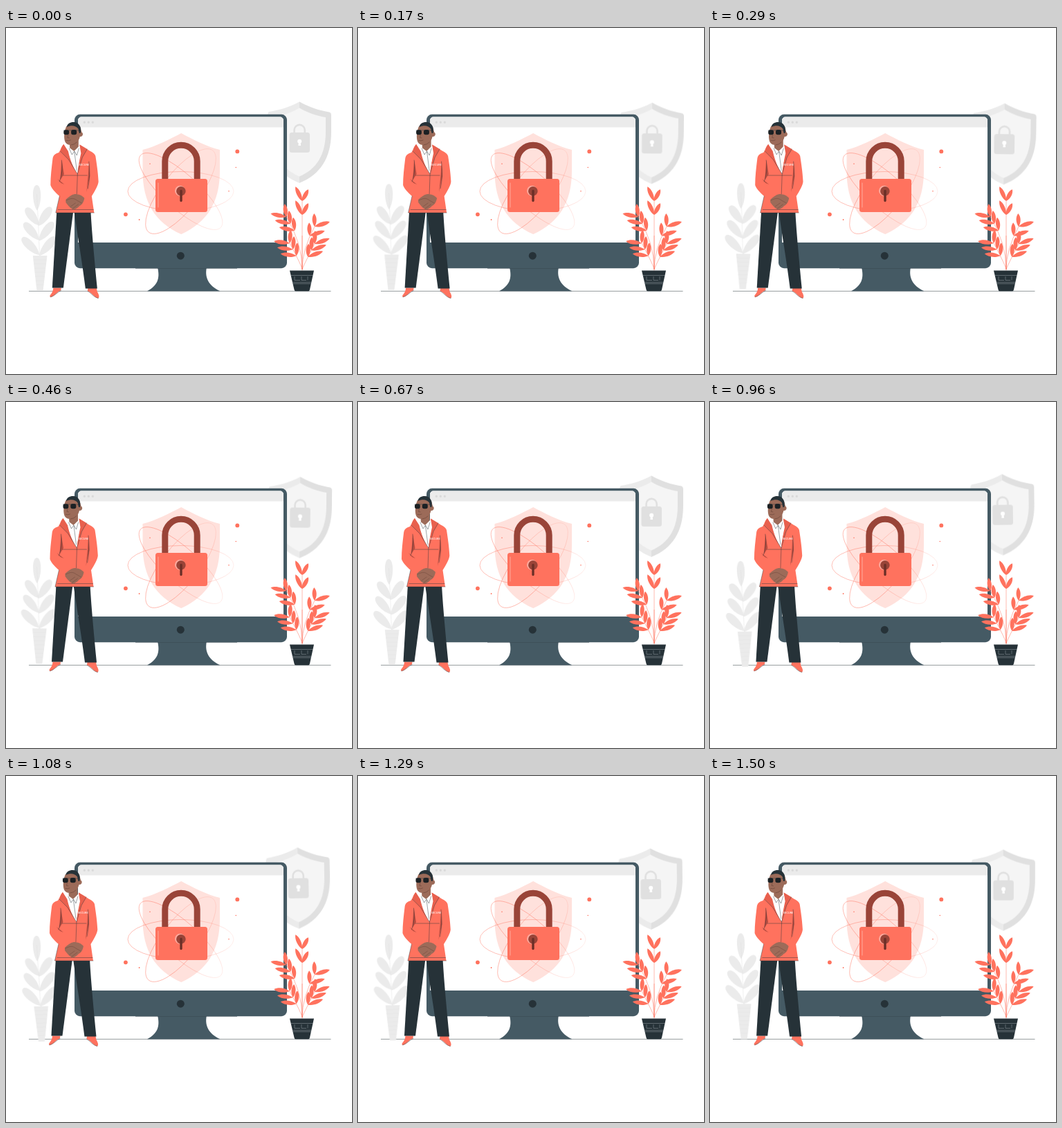
Animation, 500 px wide and 500 px high, one loop 1540 ms. Source, as an HTML page:

```html
<!DOCTYPE html>
<html lang="en">
<head>
<meta charset="utf-8">
<title>Security guard</title>
<style>
  html, body { margin: 0; width: 100%; height: 100%; overflow: hidden; background: #fff; }
  svg { display: block; width: 100vw; height: 100vh; }
  .sway, .shake { animation: 1540ms linear -55ms infinite; }
  .sway { animation-name: sway; transform-origin: 250px 250px; }
  .shake { animation-name: shake; }
  @keyframes sway {
    25% { transform: rotate(1deg); }
    75% { transform: rotate(-1deg); }
  }
  @keyframes shake {
    0%, 100% { transform: translateX(0); }
    10%, 90% { transform: translateX(-1px); }
    20%, 80% { transform: translateX(2px); }
    30%, 50%, 70% { transform: translateX(-4px); }
    40%, 60% { transform: translateX(4px); }
  }
  .coral { fill: #ff725e; }
  .dark { fill: #263238; }
  .steel { fill: #455a64; }
  .skin { fill: #9c6b59; }
  .line { fill: none; stroke: #263238; stroke-width: .45; stroke-linecap: round; stroke-linejoin: round; }
  .orbit { fill: none; stroke: url(#fade); stroke-width: .5; }
</style>
</head>
<body>
<svg viewBox="0 0 500 500">
  <defs>
    <linearGradient id="fade" gradientUnits="userSpaceOnUse" x1="176" y1="0" x2="329" y2="0">
      <stop offset=".4" stop-color="#ff725e" stop-opacity=".9"/>
      <stop offset="1" stop-color="#ff725e" stop-opacity=".25"/>
    </linearGradient>
  </defs>
  <path d="M33 380.3H469.500" stroke="#263238" stroke-width=".5"/>

  <!-- grey shield and plant -->
  <g class="sway">
    <g transform="rotate(-.14 250 250)">
      <path fill="#ebebeb" d="M424 106.500C409 115 393 119 380 121C377 123 377 133 377 150C378 188 394 212 424 224Z"/>
      <path fill="#e0e0e0" d="M424 106.500C439 115 453 119 467 121.500Q470 122 470 126V150C470 188 454 212 424 224Z"/>
      <path fill="#f5f5f5" d="M424 115.500C437 123 449 127 462 129V150C462 183 449 204 424 214.500C399 204 386 183 386 150V129C399 127 411 123 424 115.500Z"/>
      <path fill="none" stroke="#e0e0e0" stroke-width="2.600" d="M416.600 152V147.500a7.600 7.600 0 0 1 15.200 0V152"/>
      <rect x="409.500" y="151" width="29.500" height="29" rx="3.500" fill="#e0e0e0"/>
      <g fill="#fff"><circle cx="424.200" cy="163.800" r="3"/><path d="M423 165h2.500l.6 5h-3.700z"/></g>

      <path id="grey" fill="#ebebeb"/>
      <path fill="none" stroke="#e0e0e0" stroke-width=".5" d="M44.500 240Q47 285 48.500 329"/>
      <path fill="#ebebeb" d="M38.800 329H59.500L53.500 380H44.500Z"/>
      <path id="bands" stroke="#dedede" stroke-width=".4"/>
    </g>
  </g>

  <!-- monitor -->
  <path class="steel" d="M219 346C222 359 221.500 371 204 380.300H309.500C292 372 287 360 290 346Z"/>
  <rect class="steel" x="99" y="124.800" width="307" height="222.400" rx="8"/>
  <path d="M187 347.500H334" stroke="#37474f" stroke-width=".5"/>
  <path fill="#fff" d="M104 310V133.500a5 5 0 0 1 5-5H396a5 5 0 0 1 5 5V310Z"/>
  <path fill="#ebebeb" d="M104 143.500V133.500a5 5 0 0 1 5-5H396a5 5 0 0 1 5 5V143.500Z"/>
  <path d="M113.300 136.300h12.100" stroke="#dadada" stroke-width="3.400" stroke-linecap="round" stroke-dasharray="0 6"/>
  <circle class="dark" cx="252.300" cy="329.200" r="5.500"/>

  <!-- padlock -->
  <path fill="#ffe1dc" d="M253.200 152C236 161 217 171 197.500 176V207C197.500 251 215 281 253.200 298C291 281 309 251 309 207V176C289 171 270 161 253.200 152Z"/>
  <g class="orbit">
    <ellipse cx="252.500" cy="236" rx="76.500" ry="28.500"/>
    <ellipse cx="252.500" cy="236" rx="78" ry="25" transform="rotate(42 252.500 236)"/>
    <ellipse cx="252.500" cy="236" rx="75" ry="27" transform="rotate(-52 252.500 236)"/>
  </g>
  <g class="coral">
    <circle cx="334.300" cy="178.400" r="2.900"/><circle cx="172.900" cy="269.300" r="2.900"/>
    <circle cx="332.300" cy="201.500" r=".8"/><circle cx="192.600" cy="277" r=".9"/>
    <circle cx="208" cy="196.300" r=".8"/><circle cx="322" cy="235.800" r=".8"/>
  </g>
  <path fill="none" stroke="#994438" stroke-width="9" d="M229.800 219V192.500a23.200 23.200 0 0 1 46.400 0V219"/>
  <rect class="coral" x="216" y="218" width="75" height="48" rx="3.500"/>
  <path d="M220 224V259" stroke="#ffb5aa" stroke-width=".8" stroke-linecap="round"/>
  <circle cx="251.500" cy="235.300" r="7.500" fill="#ffaa9e"/>
  <circle fill="#994438" cx="252.900" cy="235.700" r="6.800"/>
  <path d="M253 235.500V249.500" stroke="#6b2f27" stroke-width="3.400" stroke-linecap="round"/>

  <!-- guard -->
  <g class="shake">
    <g transform="translate(.7)">
      <path class="coral" d="M68 375.500H79.500L79 379C74 381 70 387 65 388.800Q62 389 63.500 386C66 383 68 380 68 375.500Z"/>
      <path class="coral" d="M118 376H130.500L131.500 381Q134.500 386 134 389Q133.500 391 131.500 390.300C126 388 123 382 117.500 380Z"/>
      <path class="line" d="M64 388.800C70 387.500 74 381.500 79 379.500M118 380.500C123 383 126 389 133 390.500"/>
      <path class="dark" d="M73 264H97L82.500 375.500H66.500Z"/>
      <path class="dark" d="M98 264H122C124 300 128 340 131.500 376.500H114.500C110 340 103 300 98 264Z"/>

      <path class="skin" d="M91 160H104.500V174L101 184L92 175Z"/>
      <path fill="#fff" d="M90 172L98 178L105 171L110 182L104 215H99L88 182Z"/>
      <path class="line" d="M91 174L95 183L98.500 178L102 184L105 174M98.500 179L102 206"/>

      <path class="coral" d="M83 168C79 172 79 176 76 180C70 182 67.500 184 67 190C65.500 202 64 215 64 227C65 231 70 237 77 243L71.500 267H127L123.500 243C128 236 133 227 133.300 222C132.500 207 130.500 195 129 185C127.500 180 121 178 116.500 175L106 168.500L109 182C106 191 104 200 103 211C97 202 92 191 89 179Z"/>
      <path fill="#e8604e" d="M83 168C79.500 172 79 176 78.500 178L90 190L102.500 212C97 202 92 190 89.500 178ZM106 168.500L117 175L110 187L103 211C104 200 106 190 108 181Z"/>
      <path fill="#b84d40" d="M80 191L83.500 211L78 220ZM119.500 193L121 214L116 237L118.500 212ZM74 218L84 226L79 224Z"/>
      <path class="line" d="M80 191C82 204 80 212 77 222M119.500 193C121 207 121 218 118 232M82 213H117M103 211L102 240M75 262.500H126M78 178L90 190L103 211L110 187L117 175M77 243L71.500 267H127"/>
      <text x="105" y="199" font-family="Inter, Arial, sans-serif" font-size="3.700" font-weight="600" fill="#fff" opacity=".85">SECURE</text>

      <path class="skin" d="M86 248C90 244 94 241 99 240C105 240 110 242 113 246C112 251 110 255 106 257C103 260 100 263 96 262C92 260 89 256 86 252Z"/>
      <path fill="none" stroke="#6d463a" stroke-width=".5" stroke-linecap="round" d="M87 249C93 246 97 245 102 249L109 253M93 258L100 253M96 261L104 255"/>

      <path class="skin" d="M87 142C84 148 83.500 155 84 160C84.500 166 88 169 93 169C100 169 105 164 106.500 157C111 157.500 112 152 109 150.500L107 143L98 138Z"/>
      <path class="dark" d="M87.500 143C88 138 93 135.700 98 136C104 136.500 107.500 141 107.800 147L107.300 152H105.500L104 145.500C101 141.500 95 139.800 87.500 143Z"/>
      <g fill="#1b2023">
        <rect x="83" y="147.200" width="7.800" height="7" rx="2.700"/>
        <rect x="93.800" y="147" width="8" height="7.300" rx="2.800"/>
      </g>
      <path class="line" d="M83 148L101.500 147.700L108 149.500"/>
      <path fill="none" stroke="#5d3a30" stroke-width=".5" stroke-linecap="round" d="M89.500 154.500L88.500 158.500L91 158.800M87 162.500Q90 163.500 93 162M94 169Q99 168.500 102 165"/>
    </g>
  </g>

  <!-- coral plant -->
  <path id="stems" fill="none" stroke="#ff725e" stroke-width=".5"/>
  <path id="coral" class="coral"/>
  <path class="dark" d="M410 350.500H445L439 378Q438.500 380.300 437 380.300H418.500Q417 380.300 416.500 378Z"/>
  <path fill="none" stroke="#b4bcc0" stroke-width=".4" d="M411.500 357.500H443.500M413.500 367.500H441.300M414 369.500H441M417 359V364.500H425M427 359V364.500H434M436 359V364.500"/>
</svg>
<script>
  const draw = (id, d) => document.getElementById(id).setAttribute('d', d);

  // Leaf from (x, y) along (dx, dy), w wide; blunt moves the bulge towards the tip
  function leaf(x, y, dx, dy, w, blunt) {
    const k = w * .68 / Math.hypot(dx, dy);
    const ctrl = (f, s) => `${x + dx * f - dy * k * s} ${y + dy * f + dx * k * s}`;
    return `M${x} ${y}C${ctrl(.3, 1)} ${ctrl(blunt, 1)} ${x + dx} ${y + dy}` +
      `C${ctrl(blunt, -1)} ${ctrl(.3, -1)} ${x} ${y}Z`;
  }

  // Grey plant: a top leaf, three pairs below, and a banded pot
  let grey = leaf(45, 264, -.6, -37, 11, 1), bands = '';
  for (let k = 0; k < 3; k++) {
    const x = 47 + k * .7, y = 285 + k * 21.500;
    grey += leaf(x, y, -18 - k * 3.500, -25, 12, 1) + leaf(x, y + 1, 18 + k * 2.500, -27, 12, 1);
  }
  for (let y = 335; y < 375; y += 6) {
    const inset = (y - 329) * .115;
    bands += `M${39 + inset} ${y}H${59.200 - inset}`;
  }
  draw('grey', grey);
  draw('bands', bands);

  // Coral plant: each stem carries leaf pairs, spaced back from its tip
  let stems = 'M428 351V300', coral = '';
  function stem(x, y, tx, ty, pairs, outer, inner) {
    stems += `M428 349Q${x} ${y} ${tx} ${ty}`;
    for (let i = 0; i < pairs; i++) {
      const t = i * .8 / pairs, px = tx + (x - tx) * t, py = ty + (y - ty) * t;
      [[outer, 23], [inner, 19]].forEach(([deg, len]) => {
        const a = deg * Math.PI / 180;
        coral += leaf(px, py, len * Math.cos(a), -len * Math.sin(a), 6, .75);
      });
    }
  }
  stem(428, 300, 428, 250, 2, 115, 62);
  stem(428, 310, 405, 273, 3, 168, 97);
  stem(428, 320, 446, 287, 2, 18, 92);
  stem(428, 345, 410, 311, 3, 173, 86);
  stem(428, 347, 446, 312, 3, 20, 88);
  draw('stems', stems);
  draw('coral', coral);
</script>
</body>
</html>
```
